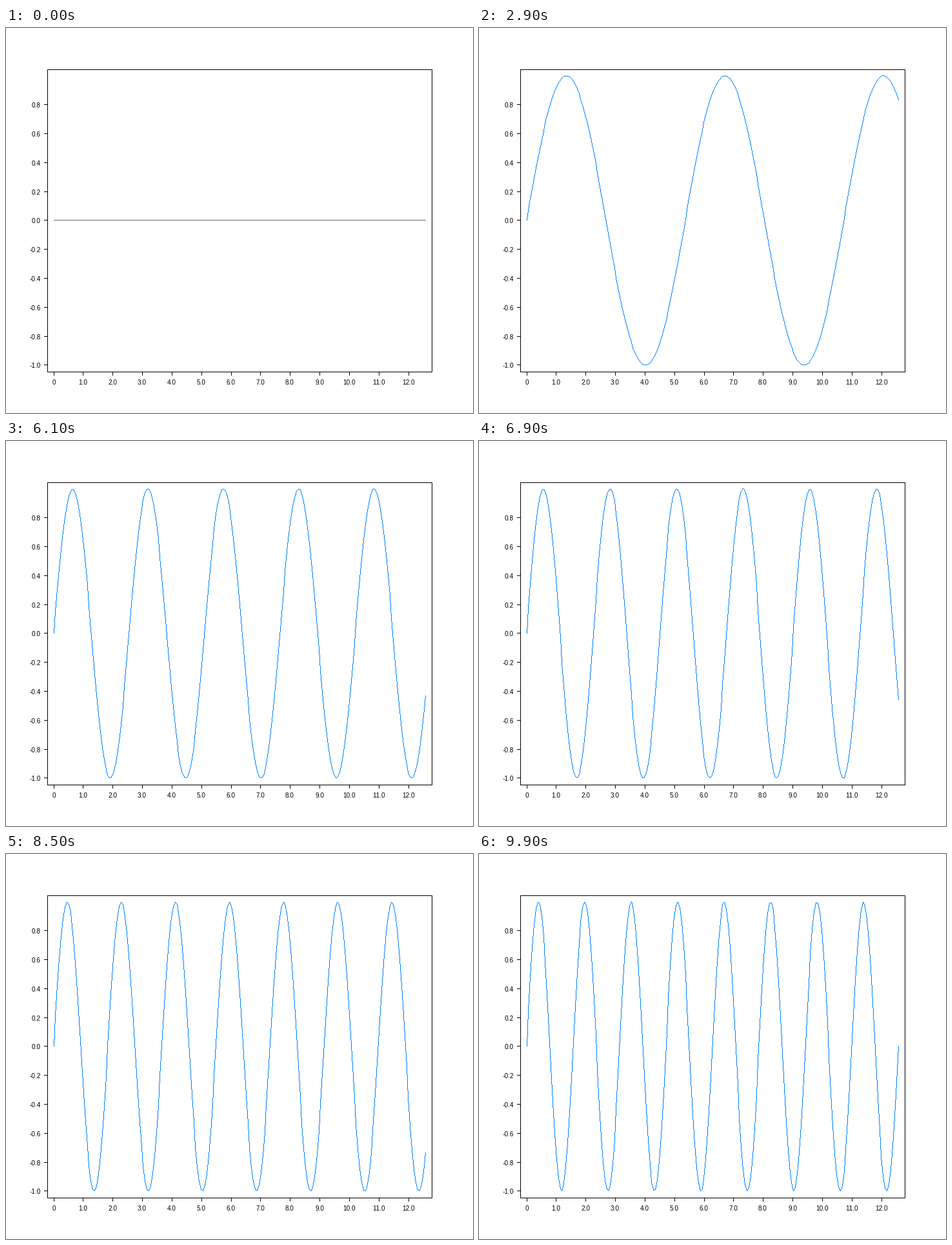
A matplotlib script that plays this animation: 724x596 px, repeating every 10000 ms.

```python
import numpy as np
import matplotlib.pyplot as plt
from matplotlib.animation import FuncAnimation

W, H, DPI = 724, 596, 64
PT = 72 / DPI  # points per pixel
FRAMES, INTERVAL = 100, 100

LEFT, RIGHT, TOP, BOTTOM = 64, 660, 64, 532
PAD, TICK = 10, 5
X_MAX = 4 * np.pi
BLUE, GRAY = (0, 128, 255), (102, 102, 102)

plt.rcParams["font.family"] = "Liberation Sans"
plt.rcParams["text.kerning_factor"] = 6

fig = plt.figure(figsize=(W / DPI, H / DPI), dpi=DPI, facecolor="white")
ax = fig.add_axes([0, 0, 1, 1])
ax.axis("off")


def px(x):
    """Pixel column of a data x value."""
    return np.floor(LEFT + PAD + x / X_MAX * (RIGHT - LEFT - 2 * PAD))


def py(y):
    """Pixel row of a data y value."""
    half = (BOTTOM - TOP) / 2
    return np.floor(TOP + half - 0.01 - y * (half - PAD))


def rule(x0, y0, x1, y1):
    ax.plot([x0 + 0.5, x1 + 0.5], [y0 + 0.5, y1 + 0.5], color="black",
            lw=PT, solid_capstyle="projecting", snap=False)


def label(x, y, text, ha):
    ax.text(x, y, text, ha=ha, va="baseline", size=10 * PT, color="black")


def draw_axes():
    for y in (TOP, BOTTOM):
        rule(LEFT, y, RIGHT, y)
    for x in (LEFT, RIGHT):
        rule(x, TOP, x, BOTTOM)
    for v in range(13):
        x = px(v)
        rule(x, BOTTOM, x, BOTTOM + TICK)
        label(x, 552, f"{v:.1f}" if v else "0", "center")
    for k in range(-5, 5):
        y = py(k / 5)
        rule(LEFT - TICK, y, LEFT, y)
        label(LEFT - 10, y + 5, f"{k / 5:.1f}", "right")


def trace(cols, rows):
    """Pixels of a one-pixel, unsmoothed polyline."""
    points = np.column_stack([rows, cols])
    parts = []
    for a, b in zip(points[:-1], points[1:]):
        n = int(np.abs(b - a).max())
        parts.append(np.linspace(a, b, n + 1))
    return np.floor(np.concatenate(parts) + 0.5).astype(int).T


canvas = np.zeros((H, W, 4), np.uint8)
curve = ax.imshow(canvas, extent=(0, W, H, 0), interpolation="nearest",
                  aspect="auto", zorder=3)
draw_axes()
ax.set(xlim=(0, W), ylim=(H, 0))

xs = np.linspace(0, X_MAX, 200)
freqs = np.linspace(0, 4, FRAMES)


def update(i):
    canvas[:] = 0
    rows, cols = trace(px(xs), py(np.sin(freqs[i] * xs)))
    canvas[rows, cols] = (*(BLUE if i else GRAY), 255)
    curve.set_data(canvas)
    return curve,


anim = FuncAnimation(fig, update, frames=FRAMES, interval=INTERVAL,
                     repeat=True, repeat_delay=0, blit=False)
plt.show()
```
